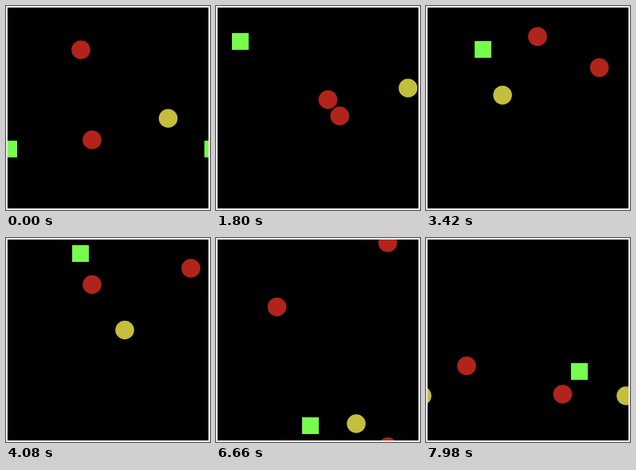
Recreate the animation shown at these times as an HTML page with a canvas. Size 256x256 px, loop 8 s.

```html
<!DOCTYPE html>
<html lang="en">
<head>
<meta charset="utf-8">
<title>Wrapping arena</title>
<style>
  html, body { margin: 0; width: 100%; height: 100%; overflow: hidden; background: #e6e6e6; }
  canvas { display: block; width: 100vw; height: 100vh; }
</style>
</head>
<body>
<canvas width="256" height="256"></canvas>
<script>
const ctx = document.querySelector('canvas').getContext('2d');
const LOOP = 8000, STEP = 60, WORLD = 256, BORDER = 2;
const RADIUS = 11.8, SIDE = 21, SPEED = 3.8;

// Waypoints are reached by all actors at the same steps.
const turns = [0, 30, 47, 68, 89, 111, 133];
const actors = [
  { color: '#b2241b', draw: disc,
    stops: [[94, 55], [140.5, 117.5], [204.5, 113], [232, 38], [156.5, 65], [76.5, 86.5], [51, 160.5]] },
  { color: '#b2241b', draw: disc,
    stops: [[108, 168], [155.3, 138], [150, 73.5], [108, 58.5], [30, 50], [215.5, 6], [171.5, 196]] },
  { color: '#c3be3e', draw: disc,
    stops: [[203.5, 141], [241, 103], [48, 108.5], [149, 115.5], [124.3, 44], [176, 233], [251, 198]] },
  { color: '#77fc4d', draw: box,
    stops: [[3.5, 179.5], [30.5, 44.5], [41.5, 77.8], [93.5, 19.5], [74.5, 5.5], [118.5, 235.5], [192.5, 167]] }
];

const wrap = value => ((value % WORLD) + WORLD) % WORLD;
const shortest = delta => wrap(delta + WORLD / 2) - WORLD / 2;

// Travel the shortest wrapped way; time to spare at cruising speed is spent on a sideways bow.
function position(stops, step) {
  const next = turns.findIndex((turn, i) => i > 0 && step <= turn);
  const [x, y] = stops[next - 1];
  const dx = shortest(stops[next][0] - x), dy = shortest(stops[next][1] - y);
  const duration = turns[next] - turns[next - 1];
  const u = (step - turns[next - 1]) / duration;
  const length = Math.hypot(dx, dy);
  const spare = Math.sqrt(Math.max(0, (SPEED * duration) ** 2 - length ** 2));
  const bow = 0.45 * spare * Math.sin(Math.PI * u) / length;
  return [x + dx * u - dy * bow, y + dy * u + dx * bow];
}

function disc(x, y) {
  ctx.beginPath();
  ctx.arc(x, y, RADIUS, 0, Math.PI * 2);
  ctx.fill();
}

function box(x, y) {
  ctx.fillRect(Math.round(x - SIDE / 2), Math.round(y - SIDE / 2), SIDE, SIDE);
}

function render(step) {
  const inner = WORLD - 2 * BORDER;
  ctx.fillStyle = '#e6e6e6';
  ctx.fillRect(0, 0, WORLD, WORLD);
  ctx.save();
  ctx.beginPath();
  ctx.rect(BORDER, BORDER, inner, inner);
  ctx.clip();
  ctx.fillStyle = '#000';
  ctx.fillRect(0, 0, WORLD, WORLD);
  for (const { color, draw, stops } of actors) {
    const [x, y] = position(stops, step).map(wrap);
    ctx.fillStyle = color;
    for (const dx of [-WORLD, 0, WORLD])
      for (const dy of [-WORLD, 0, WORLD]) draw(x + dx, y + dy);
  }
  ctx.restore();
}

const start = performance.now();
function tick() {
  render(Math.floor(((performance.now() - start) % LOOP) / STEP));
  requestAnimationFrame(tick);
}
tick();
</script>
</body>
</html>
```
